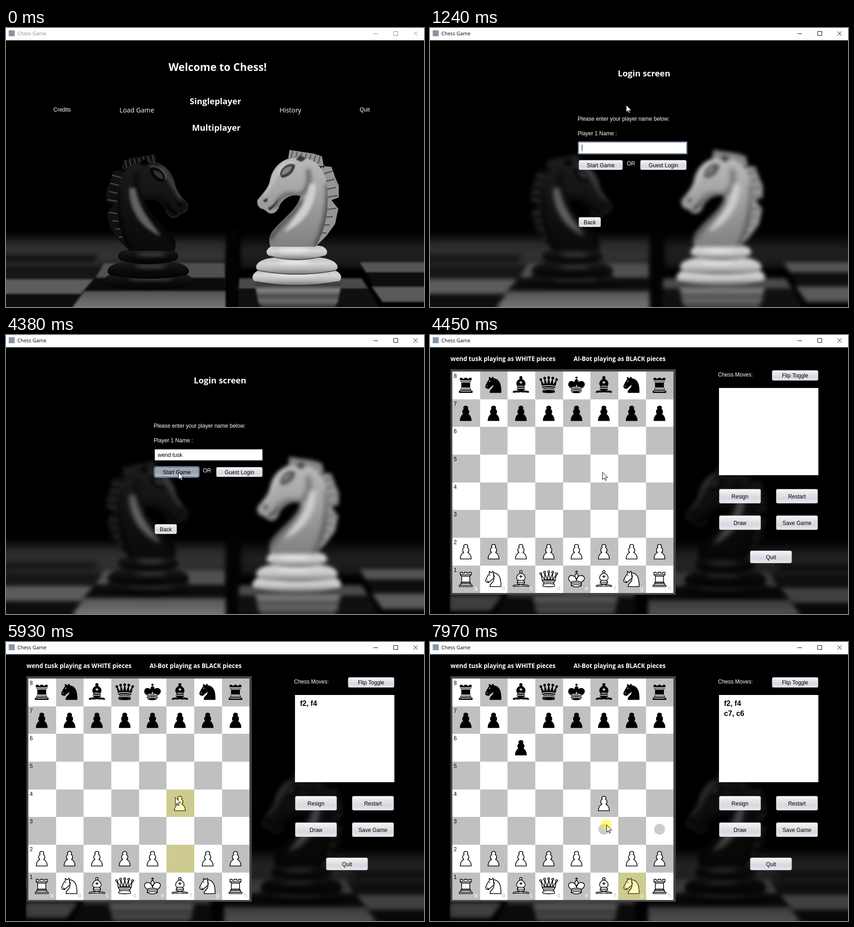
Animation, 917 px wide and 611 px high, one loop 8000 ms. Source, as an HTML page with a canvas:

```html
<!DOCTYPE html>
<html lang="en">
<head>
<meta charset="utf-8">
<title>Chess Game</title>
<style>
  html, body { margin: 0; width: 100%; height: 100%; overflow: hidden; background: #000; }
  canvas { display: block; }
</style>
</head>
<body>
<canvas id="stage" width="917" height="611"></canvas>
<script>
const W = 917, H = 611, LOOP = 8000;
const ctx = document.getElementById('stage').getContext('2d');
const ARIAL = '"Liberation Sans", sans-serif', SEGOE = '"Open Sans", sans-serif';
const PLAYER = 'wend tusk';

// Times at which the picture changes state
const T = { active: 1000, login: 1070, start: 4200, game: 4450, pick: 4950, move: 5640, reply: 6010, knight: 7460 };
const keyTimes = [2190, 2290, 2420, 2550, 2650, 2750, 2850, 2990, 3060];
const clicks = [[1000, 1070], [4200, 4380], [4930, 5010], [5410, 5640], [7440, 7520], [7960, 8000]];
const path = [
  [230, 832, 605], [780, 430, 168], [1250, 430, 168], [1790, 452, 281], [3560, 452, 281],
  [4200, 378, 300], [4480, 378, 300], [4900, 376, 462], [5030, 376, 462], [5410, 371, 340],
  [6010, 371, 340], [6270, 345, 270], [6570, 345, 270], [6850, 308, 206], [7350, 437, 495],
  [7440, 441, 522], [7540, 441, 522], [7900, 387, 400], [8000, 387, 400]
];

// ---------- background photograph ----------
function layer(paint) {
  const canvas = document.createElement('canvas');
  canvas.width = W; canvas.height = H;
  paint(canvas.getContext('2d'));
  return canvas;
}

function vertical(c, y1, y2, ...colors) {
  const g = c.createLinearGradient(0, y1, 0, y2);
  colors.forEach((color, i) => g.addColorStop(i / (colors.length - 1), color));
  return g;
}

function poly(c, fill, d) {
  c.fillStyle = fill;
  c.fill(new Path2D(d));
}

function floor(c) {
  c.filter = 'blur(5px)';
  poly(c, vertical(c, 448, 525, '#000', '#2a2a2a', '#343434', '#1e1e1e'), 'M-20 448H485L480 530H-20Z');
  poly(c, vertical(c, 448, 525, '#000', '#202020', '#161616'), 'M515 448H950V525H515Z');
  poly(c, '#131313', 'M-20 497H205L190 512H-20Z');
  c.filter = 'blur(2px)';
  poly(c, '#161616', 'M-20 527H482V620H-20Z');
  poly(c, '#5c5c5c', 'M-20 550H195L163 583H-20Z');
  poly(c, '#0e0e0e', 'M-20 584H162L140 620H-20Z');
  poly(c, '#505050', 'M215 515H480V548H196Z');
  poly(c, '#0b0b0b', 'M194 548H480V576H172Z');
  poly(c, vertical(c, 576, 611, '#525252', '#747474'), 'M172 576H482V620H140Z');
  poly(c, '#030303', 'M486 440H508V620H484Z');
  poly(c, '#4a4a4a', 'M512 548H780L795 572H510Z');
  poly(c, '#101010', 'M510 572H796L822 620H508Z');
  poly(c, '#555', 'M776 513H950V536H790Z');
  poly(c, '#0e0e0e', 'M790 537H950V565H806Z');
  poly(c, '#5a5a5a', 'M802 566H950V600H826Z');
  poly(c, vertical(c, 562, 611, '#333', '#868686', '#4c4c4c', '#6a6a6a', '#303030'), 'M546 560H736L728 600 715 620H565L553 600Z');
  c.filter = 'none';
}

const black = { mane: '#101010', stripe: '#4a4a4a', body: ['#1c1c1c', '#121212', '#0a0a0a'], shine: '#626262',
  edge: '#343434', shade: '#020202', base: ['#1c1c1c', '#101010', '#080808', '#040404'], gloss: '#454545' };
const white = { mane: '#949494', stripe: '#4e4e4e', body: ['#bcbcbc', '#a0a0a0', '#808080'], shine: '#cfcfcf',
  edge: '#858585', shade: '#383838', base: ['#c4c4c4', '#d6d6d6', '#b4b4b4', '#707070'], gloss: '#eee' };

const BODY = 'M271 488C248 450 242 405 245 368C246 325 264 300 292 295L305 288 313 293C340 292 364 312 370 340C373 360 386 371 398 386C400 396 394 405 385 405L373 414C362 417 356 411 351 400C343 383 325 371 304 377C310 405 340 424 362 450C375 464 373 478 370 488Z';

// A knight facing right; the other one is its mirror image
function knight(c, tone) {
  const stroke = (color, width, d) => {
    c.strokeStyle = color; c.lineWidth = width; c.stroke(new Path2D(d));
  };
  const ring = (top, bottom, narrow, wide) => {
    const l = 312 - wide, r = 312 + wide, low = bottom - 9;
    poly(c, vertical(c, top, bottom, ...tone.base),
      `M${312 - narrow} ${top}C${l - 2} ${top + 6} ${l - 4} ${low - 4} ${l + 6} ${low}Q312 ${bottom + 8} ${r - 6} ${low}C${r + 4} ${low - 4} ${r + 2} ${top + 6} ${312 + narrow} ${top}Q312 ${top - 8} ${312 - narrow} ${top}Z`);
    c.filter = 'blur(4px)';
    c.fillStyle = tone.gloss;
    c.beginPath(); c.ellipse(318, top + 9, narrow * 0.6, 4, 0, 0, 7); c.fill();
    c.filter = 'none';
    stroke(tone.shade, 1.5, `M${l + 5} ${low}Q312 ${bottom + 8} ${r - 5} ${low}`);
  };
  ring(540, 573, 84, 97);
  ring(513, 549, 60, 90);
  ring(487, 517, 56, 66);

  poly(c, tone.mane, 'M252 315 257 290 276 284 328 276 331 294 290 300ZM258 311 236 313 227 338 220 354V380L236 386 221 405 228 438 247 464 270 487 275 430Z');
  for (let i = 0; i < 8; i++) {
    const y = 322 + i * 18 + (i > 3 ? 10 : 0), x = i < 4 ? 232 - i * 3 : 226 + (i - 4) * 7;
    stroke(tone.stripe, 2.5, `M${x} ${y}L${x + 24} ${y + 7 - i}`);
    if (i < 7) stroke(tone.stripe, 2, `M${261 + i * 10} ${290 - i * 2}l4 16`);
  }

  poly(c, vertical(c, 285, 490, ...tone.body), BODY);
  c.save();
  c.clip(new Path2D(BODY));
  c.filter = 'blur(5px)';
  c.globalAlpha = 0.7;
  stroke(tone.shade, 18, 'M240 350C238 400 248 450 268 490');
  stroke(tone.shade, 11, 'M300 385C312 412 345 430 372 472');
  stroke(tone.shade, 8, 'M288 318C280 350 292 370 310 376Q345 364 360 402');
  c.globalAlpha = 1;
  stroke(tone.shine, 6, 'M338 302C358 318 364 348 386 374');
  c.filter = 'blur(3px)';
  poly(c, tone.shine, 'M270 350C270 400 296 438 340 456C322 428 292 400 284 350Z');
  c.restore();
  stroke(tone.edge, 1.5, 'M313 293C340 292 364 312 370 340C373 360 386 371 398 386C400 396 394 405 385 405L373 414C362 417 356 411 351 400');

  c.filter = 'blur(1px)';
  poly(c, tone.shade, 'M316 309C328 302 348 314 349 330L345 337C331 336 317 325 316 309Z');
  stroke(tone.shine, 2, 'M315 304C332 297 352 315 351 331');
  poly(c, tone.edge, 'M322 311Q343 312 346 331Q328 330 322 311Z');
  poly(c, tone.shade, 'M292 295 305 287 314 297 302 302ZM376 381 386 386 383 391 377 389ZM351 381Q362 398 376 403L371 409Q356 398 351 381Z');
  c.filter = 'none';
}

const sharp = layer(c => {
  c.fillStyle = '#000'; c.fillRect(0, 0, W, H);
  floor(c);
  knight(c, black);
  c.setTransform(-1, 0, 0, 1, 950, -9);
  knight(c, white);
});
const blurred = layer(c => { c.filter = 'blur(4px)'; c.drawImage(sharp, 0, 0); });
const dim = layer(c => {
  c.fillStyle = '#000'; c.fillRect(0, 0, W, H);
  c.globalAlpha = 0.7;
  c.setTransform(-1, 0, 0, 1, 960, 4);
  c.drawImage(blurred, 0, 0);
});

// ---------- widgets ----------
function text(s, x, y, font, color = '#fff', align = 'left') {
  ctx.font = font; ctx.fillStyle = color; ctx.textAlign = align;
  ctx.fillText(s, x, y);
}
const plain = (s, x, y, color) => text(s, x, y, '12px ' + ARIAL, color);
const bold = (s, x, y, size, color) => text(s, x, y, `bold ${size}px ${SEGOE}`, color);

function rect(x, y, w, h, fill) {
  ctx.fillStyle = fill; ctx.fillRect(x, y, w, h);
}

function rounded(x, y, w, h, r, fill) {
  ctx.fillStyle = fill;
  ctx.beginPath(); ctx.roundRect(x, y, w, h, r); ctx.fill();
}

function button(label, x, y, w, h, pressed) {
  if (pressed) rounded(x - 1.5, y - 1.5, w + 3, h + 3, 5, '#73a4d1');
  rounded(x, y, w, h, 4, pressed ? '#4d5b6c' : '#8d9096');
  const shades = pressed ? ['#a6adb6', '#969faa', '#b8c0c9'] : ['#fafafb', '#e3e5e9', '#d5d8de', '#ebedf1'];
  rounded(x + 1, y + 1, w - 2, h - 2, 3, vertical(ctx, y, y + h, ...shades));
  text(label, x + w / 2, y + h / 2 + 4.5, '12px ' + ARIAL, '#000', 'center');
}

function titleBar(active) {
  const color = active ? '#000' : '#8c8c8c';
  rect(0, 0, W, 27, '#fff');
  rect(6, 5, 13, 13, '#8797a5');
  text('Chess Game', 25, 16, '11px ' + SEGOE, color);
  ctx.strokeStyle = color; ctx.lineWidth = 1;
  ctx.stroke(new Path2D('M806 12.5H816M850.5 7.5H859.5V16.5H850.5ZM894 7.5L903 16.5M903 7.5L894 16.5'));
}

// ---------- screens ----------
function menu(t) {
  ctx.drawImage(sharp, 0, 0);
  const p = pointer(t);
  const hover = p && p.x > 403 && p.x < 516 && p.y > 150 && p.y < 174;
  bold('Welcome to Chess!', 356.5, 94, 23.2);
  bold('Singleplayer', 403, 167, 18.4, hover ? '#c0c0c0' : '#fff');
  bold('Multiplayer', 408, 225, 18.4);
  plain('Credits', 104, 183);
  text('Load Game', 249, 185, '14.3px ' + SEGOE);
  text('History', 600, 185, '14.3px ' + SEGOE);
  plain('Quit', 776, 183);
}

function login(t) {
  const pressed = t >= T.start;
  ctx.drawImage(blurred, 0, 0);
  bold('Login screen', 412, 106, 18.4);
  plain('Please enter your player name below:', 324, 203);
  plain('Player 1 Name :', 324, 235);
  if (!pressed) rounded(324.5, 248.5, 240, 28, 1, '#7d97b5');
  rect(326, 250, 237, 25, '#8d9096');
  rect(327, 251, 235, 23, '#fff');
  const typed = PLAYER.slice(0, keyTimes.filter(k => t >= k).length);
  plain(typed, 333, 267, '#000');
  if (!pressed) rect(Math.round(333 + ctx.measureText(typed).width), 255, 1, 15, '#000');
  button('Start Game', 326, 289, 97, 22, pressed);
  plain('OR', 432, 301);
  button('Guest Login', 461, 289, 102, 22);
  button('Back', 326, 414, 49, 22);
}

// Pieces on a 45-unit square: filled outline, then inner lines
const shapes = {
  p: ['M22.5 9C18.5 9 17 13 19.3 15.4C15 18 15 23.500 18.400 26C15.400 27 11 31.600 11 39.500H34C34 31.600 29.600 27 26.600 26C30 23.500 30 18 25.700 15.400C28 13 26.500 9 22.500 9Z', ''],
  r: ['M9 39H36V36H9ZM12 36V32H33V36ZM11 14V9H15V11H20V9H25V11H30V9H34V14L31 17V29.5L32.5 32H12.5L14 29.5V17Z',
    'M12 36H33M13 32H32M14 29.5H31M14 17H31M11 14H34'],
  n: ['M22 10C32.5 11 38.5 18 38 39H15C15 30 25 32.5 23 18ZM24 18C24.4 21 18.5 25.400 16 27C13 29 13.200 31.300 11 31C10 30 12.400 28 11 28C10 28 11.200 29.200 10 30C9 30 6 31 6 26C6 24 12 14 12 14S13.900 12 14 10.500C13.300 9.500 13.500 8.500 13.500 7.500C14.500 6.500 16.500 10 16.500 10H18.500S19.300 8 21 7C22 7 22 10 22 10Z',
    'M9 25.3V25.7M14.800 15L14.200 16'],
  b: ['M9 36C12.400 35 19.100 36.400 22.500 34C25.900 36.400 32.600 35 36 36S39 38 39 38C38.300 39 37.300 39 36 38.500C32.600 37.500 25.900 39 22.500 37.500C19.100 39 12.400 37.500 9 38.500C7.700 39 6.700 39 6 38C7.400 36 9 36 9 36ZM15 32C17.500 34.500 27.500 34.500 30 32C30.500 30.500 30 30 30 30C30 27.500 27.500 26 27.500 26C33 24.500 33.500 14.500 22.500 10.500C11.500 14.500 12 24.500 17.500 26C17.500 26 15 27.500 15 30C15 30 14.500 30.500 15 32ZM25 8A2.500 2.500 0 1 1 20 8A2.500 2.500 0 1 1 25 8Z',
    'M17.5 26H27.5M15 30H30M22.5 15.5V20.5M20 18H25'],
  q: ['M9 26C17.500 24.500 30 24.500 36 26L38.500 13.500 31 25 30.700 11 25.500 24.500 22.500 10 19.500 24.500 14.300 11 14 25 6.500 13.500ZM9 26C9 28 10.500 28 11.500 30S12.500 31 12 33.500C10.500 34.500 10.500 36 10.500 36C9 37.500 11 38.500 11 38.500C17.500 39.500 27.500 39.500 34 38.500C34 38.500 35.500 37.500 34 36C34 36 34.500 34.500 33 33.500C32.500 31 32.500 31.500 33.500 30S36 28 36 26Z'
    + [[6, 12], [14, 9], [22.5, 8], [31, 9], [39, 12]].map(([x, y]) => `M${x - 2} ${y}a2 2 0 1 1 4 0a2 2 0 1 1 -4 0Z`).join(''),
    'M9 26C17.500 24.500 27.500 24.500 36 26M11.500 30C15 29 30 29 33.500 30M12 33.500C18 32.500 27 32.500 33 33.500'],
  k: ['M22.5 11.6V6M20 8H25M22.5 25S27 17.5 25.500 14.500C25.500 14.500 24.500 12 22.500 12S19.500 14.500 19.500 14.500C18 17.500 22.500 25 22.500 25ZM11.500 37C17 40.500 27 40.500 32.500 37V30S41.500 25.500 38.500 19.500C34.500 13 25 16 22.500 23.500C19 16 9.500 13 6.500 19.500C3.500 25.500 11.500 30 11.500 30Z',
    'M22.5 23.5V27M11.5 30C17 27 27 27 32.500 30M11.500 33.500C17 30.500 27 30.500 32.500 33.500M11.500 37C17 34 27 34 32.500 37']
};
for (const kind in shapes) shapes[kind] = shapes[kind].map(d => new Path2D(d));

const CELL = 60.65, LEFT = 49, TOP = 80;
const cellX = file => Math.round(LEFT + file * CELL), cellY = row => Math.round(TOP + row * CELL);
const square = name => [name.charCodeAt(0) - 97, 8 - name[1]];

function piece(kind, file, row, isWhite) {
  const [outline, lines] = shapes[kind];
  ctx.save();
  ctx.translate(cellX(file) + 5.8, cellY(row) + 5);
  ctx.scale(1.05, 1.05);
  ctx.lineWidth = 1.5; ctx.lineJoin = ctx.lineCap = 'round';
  ctx.fillStyle = isWhite ? '#fff' : '#000';
  ctx.fill(outline);
  ctx.strokeStyle = '#000';
  ctx.stroke(outline);
  ctx.strokeStyle = isWhite ? '#000' : '#fff';
  ctx.stroke(lines);
  ctx.restore();
}

function fillCell(file, row, fill) {
  const x = cellX(file), y = cellY(row);
  rect(x, y, cellX(file + 1) - x, cellY(row + 1) - y, fill);
}

function board(t) {
  rect(45, 75, 494, 494, '#464646');
  for (let row = 0; row < 8; row++)
    for (let file = 0; file < 8; file++) fillCell(file, row, (row + file) % 2 ? '#c0c0c0' : '#fff');
  for (let i = 0; i < 8; i++) {
    plain(8 - i, 52, 94 + i * CELL, '#000');
    text('abcdefgh'[i], 104 + i * CELL, 559, '12px ' + ARIAL, i % 2 ? '#c0c0c0' : '#fff', 'right');
    const back = 'rnbqkbnr'[i];
    piece(back, i, 0, false);
    piece('p', i, i === 2 && t >= T.reply ? 2 : 1, false);
    piece('p', i, i === 5 && t >= T.move ? 4 : 6, true);
    piece(back, i, 7, true);
  }

  let marked = [], targets = [];
  if (t >= T.knight) { marked = ['g1']; targets = ['f3', 'h3']; }
  else if (t >= T.reply) marked = ['c7', 'c6'];
  else if (t >= T.move) marked = ['f2', 'f4'];
  else if (t >= T.pick) { marked = ['f2']; targets = ['f3', 'f4']; }
  for (const [file, row] of marked.map(square)) fillCell(file, row, 'rgba(245,235,0,.25)');
  for (const [file, row] of targets.map(square)) circle(cellX(file) + 29.5, cellY(row) + 27, 'rgba(0,0,0,.2)');
}

function game(t) {
  ctx.drawImage(dim, 0, 0);
  bold(PLAYER + ' playing as WHITE pieces', 45, 57, 13.3);
  bold('AI-Bot playing as BLACK pieces', 315, 57, 13.3);
  board(t);
  plain('Chess Moves:', 632, 91);
  button('Flip Toggle', 750, 77, 102, 23);
  rect(634, 116, 218, 191, '#fff');
  if (t >= T.move) text('f2, f4', 645, 140, 'bold 16px ' + ARIAL, '#000');
  if (t >= T.reply) text('c7, c6', 645, 162, 'bold 16px ' + ARIAL, '#000');
  button('Resign', 634, 337, 92, 32);
  button('Restart', 759, 337, 92, 32);
  button('Draw', 634, 395, 92, 32);
  button('Save Game', 759, 395, 92, 32);
  button('Quit', 702, 472, 92, 28);
}

// ---------- pointer ----------
function pointer(t) {
  const i = path.findIndex(p => p[0] > t);
  if (i < 1) return null;
  const [t1, x1, y1] = path[i - 1], [t2, x2, y2] = path[i];
  const u = (t - t1) / (t2 - t1), e = u * u * (3 - 2 * u);
  return { x: x1 + (x2 - x1) * e, y: y1 + (y2 - y1) * e };
}

function circle(x, y, fill) {
  ctx.fillStyle = fill;
  ctx.beginPath(); ctx.arc(x, y, 12, 0, 7); ctx.fill();
}

const arrow = new Path2D('M.5 .5V16.5L4.2 13 6.6 18.5 9 17.5 6.6 12.2H11.8Z');
function drawPointer(t) {
  const p = pointer(t);
  if (!p) return;
  if (clicks.some(([from, to]) => t >= from && t < to)) circle(p.x, p.y, 'rgba(255,250,0,.5)');
  ctx.save();
  ctx.translate(Math.round(p.x), Math.round(p.y));
  ctx.fillStyle = '#fff'; ctx.fill(arrow);
  ctx.strokeStyle = '#000'; ctx.lineWidth = 1; ctx.stroke(arrow);
  ctx.restore();
}

const begin = performance.now();
function frame() {
  const t = (performance.now() - begin) % LOOP;
  (t < T.login ? menu : t < T.game ? login : game)(t);
  titleBar(t >= T.active);
  drawPointer(t);
  requestAnimationFrame(frame);
}
frame();
</script>
</body>
</html>
```
